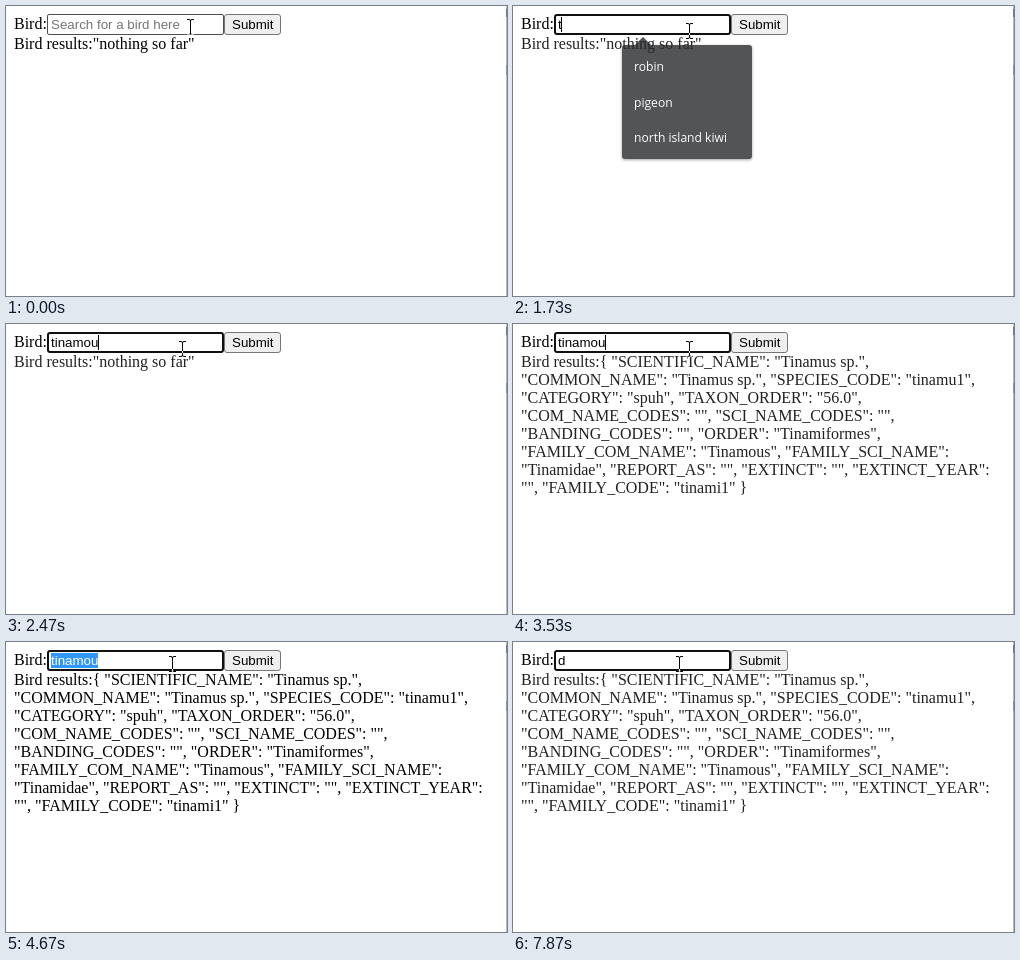
Animation of 501 by 290 pixels, one loop 8 s. Source, as an HTML page:

```html
<!DOCTYPE html>
<html lang="en">
<head>
<meta charset="utf-8">
<title>Bird search</title>
<style>
  html, body { margin: 0; width: 501px; height: 290px; overflow: hidden; background: #fff; }
  svg { display: block; isolation: isolate; }
  text { white-space: pre; }
  .page { font: 16px "Liberation Serif", "Times New Roman", serif; }
  .field { font: 13.3333px "Liberation Sans", Arial, sans-serif; }
  .menu { font: 12.1px "Open Sans", "Noto Sans", sans-serif; fill: #fff; }
  #cursor { mix-blend-mode: difference; }
</style>
</head>
<body>
<svg width="501" height="290" viewBox="0 0 501 290">
  <rect width="501" height="290" fill="#fff"/>
  <rect x="500" width="1" height="290" fill="#bdbdbd"/>
  <rect x="500" y="3" width="1" height="8" fill="#77778c"/>
  <rect x="500" y="59" width="1" height="10" fill="#9292a0"/>

  <text class="page" x="8" y="23">Bird:</text>
  <rect id="box" fill="#fff"/>
  <rect id="selection" x="45" y="11" width="47" height="15" fill="#3297fd"/>
  <text id="hint" class="field" x="45" y="23" fill="#757575">Search for a bird here</text>
  <text id="typed" class="field" x="45" y="23"></text>
  <rect id="caret" y="11" width="1" height="15"/>

  <rect x="218.5" y="8.5" width="56" height="20" rx="2.5" fill="#efefef" stroke="#767676"/>
  <text class="field" x="226" y="23">Submit</text>

  <g id="results" class="page"></g>

  <g id="popup" class="menu">
    <path d="M112 39H122L130 31L138 39H236a3 3 0 0 1 3 3V150a3 3 0 0 1-3 3H112a3 3 0 0 1-3-3V42a3 3 0 0 1 3-3z"
          fill="#292a2d" style="filter: drop-shadow(0 1px 1.5px rgba(0,0,0,.45))"/>
    <text x="121" y="65">robin</text>
    <text x="121" y="101">pigeon</text>
    <text x="121" y="136">north island kiwi</text>
  </g>

  <path id="cursor" d="M-3 .5h2q1.5 0 1.5 1.5q0-1.5 1.5-1.5h2M.5 2V14M-3 15.5h2q1.5 0 1.5-1.5q0 1.5 1.5 1.5h2"
        fill="none" stroke="#fff"/>
</svg>
<script>
const LOOP = 8000;
const EMPTY = ['Bird results:"nothing so far"'];
const FOUND = [
  'Bird results:{ "SCIENTIFIC_NAME": "Tinamus sp.",',
  '"COMMON_NAME": "Tinamus sp.", "SPECIES_CODE": "tinamu1",',
  '"CATEGORY": "spuh", "TAXON_ORDER": "56.0",',
  '"COM_NAME_CODES": "", "SCI_NAME_CODES": "",',
  '"BANDING_CODES": "", "ORDER": "Tinamiformes",',
  '"FAMILY_COM_NAME": "Tinamous", "FAMILY_SCI_NAME":',
  '"Tinamidae", "REPORT_AS": "", "EXTINCT": "", "EXTINCT_YEAR":',
  '"", "FAMILY_CODE": "tinami1" }'
];

// Each step holds only what changes at that time.
const steps = [
  [0, { x: 184, y: 13, focus: false, caret: false, word: '', popup: 0, selected: false, lines: EMPTY, ink: '#000' }],
  [70, { x: 181, y: 14 }],
  [130, { x: 178, y: 16 }],
  [200, { x: 176, y: 17 }],
  [270, { focus: true, caret: true, ink: '#222' }],
  [330, { popup: .5 }],
  [400, { popup: 1 }],
  [800, { caret: false }],
  [1330, { caret: true }],
  [1730, { word: 't', popup: .8 }],
  [1800, { popup: .5 }],
  [1870, { word: 'ti', popup: .2 }],
  [1930, { word: 'tin', popup: 0 }],
  [2070, { word: 'tina' }],
  [2200, { word: 'tinamo' }],
  [2470, { word: 'tinamou' }],
  [2870, { lines: FOUND }],
  [3000, { caret: false }],
  [3530, { caret: true }],
  [3800, { x: 173, y: 16 }],
  [3870, { x: 169, y: 15 }],
  [3930, { x: 166, y: 14 }],
  [4070, { caret: false }],
  [4600, { caret: true }],
  [4670, { caret: false, selected: true, ink: '#000' }],
  [6530, { caret: true, selected: false, word: '', ink: '#222' }],
  [7070, { word: 'd' }],
  [7200, { word: 'du' }],
  [7730, { caret: false }],
  [7870, { word: 'd' }]
];

const $ = id => document.getElementById(id);
const [box, selection, hint, typed, caret, results, popup, cursor] =
  ['box', 'selection', 'hint', 'typed', 'caret', 'results', 'popup', 'cursor'].map($);

function set(el, attrs) {
  for (const key in attrs) el.setAttribute(key, attrs[key]);
}

function show(el, on) {
  el.style.display = on ? '' : 'none';
}

function frameBox(line, color, radius) {
  set(box, {
    x: 41 + line / 2, y: 8 + line / 2, width: 177 - line, height: 21 - line,
    rx: radius, stroke: color, 'stroke-width': line
  });
}

const rows = FOUND.map((_, i) => {
  const row = document.createElementNS('http://www.w3.org/2000/svg', 'text');
  set(row, { x: 8, y: 43 + 18 * i });
  return results.appendChild(row);
});

function draw(s) {
  if (s.focus) frameBox(2, '#101010', 2);
  else frameBox(1, '#4f4f4f', 1.5);
  typed.textContent = s.word;
  set(typed, { fill: s.selected ? '#fff' : '#000' });
  show(hint, !s.word);
  show(selection, s.selected);
  show(caret, s.caret);
  const width = s.word ? typed.getComputedTextLength() : 0;
  set(caret, { x: 45 + Math.floor(width) });
  rows.forEach((row, i) => { row.textContent = s.lines[i] || ''; });
  set(results, { fill: s.ink });
  set(popup, { opacity: s.popup });
  set(cursor, { transform: `translate(${s.x} ${s.y})` });
}

const start = performance.now();
let last = -1;

function tick() {
  const t = (performance.now() - start) % LOOP;
  const count = steps.filter(([time]) => time <= t).length;
  if (count !== last) {
    last = count;
    draw(Object.assign({}, ...steps.slice(0, count).map(step => step[1])));
  }
  requestAnimationFrame(tick);
}
tick();
</script>
</body>
</html>
```
